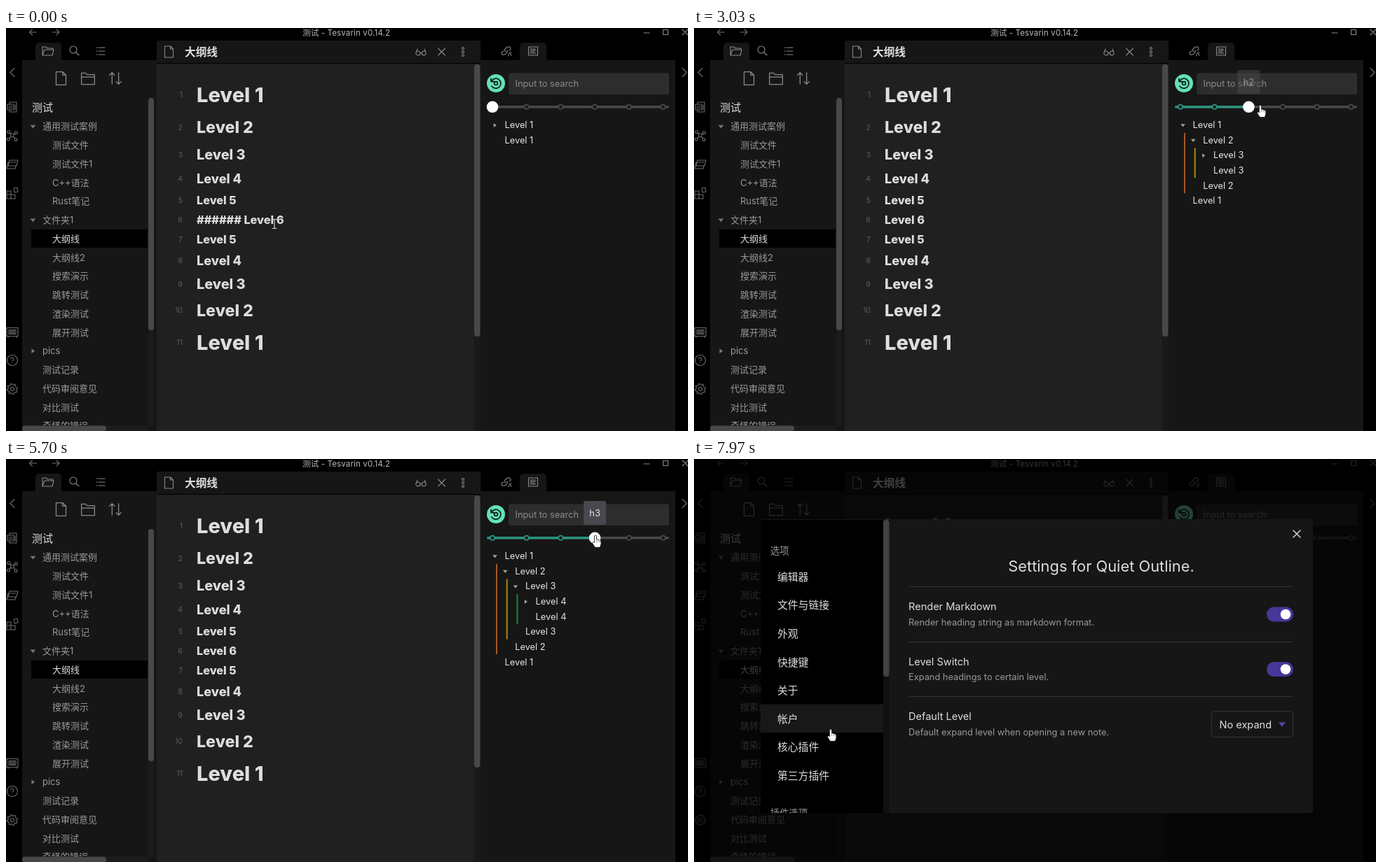
An HTML page for the animation above (8 s loop, 973 px wide and 576 px high).

```html
<!DOCTYPE html>
<html lang="zh">
<head>
<meta charset="utf-8">
<title>Outline demo</title>
<style>
html, body { margin: 0; width: 100%; height: 100%; overflow: hidden; background: #000; }
svg { display: block; font-family: Inter, 'Noto Sans CJK SC', 'Noto Sans CJK', sans-serif; font-optical-sizing: none; }
.icon { fill: none; stroke: #8a8a8a; stroke-width: 1.1; stroke-linecap: round; stroke-linejoin: round; }
.dim { stroke: #6c6c6c; }
</style>
</head>
<body>
<svg id="stage" width="973" height="576" viewBox="0 0 973 576"></svg>
<script>
const LOOP = 8000;
const SIDEBAR = '#161616', EDITOR = '#202020', BRIGHT = '#dcddde', MUTED = '#999', BAR = '#484848';
const GREEN = '#63e2b7', TEAL = '#2a947d', RAIL = '#494949';

const clamp = v => Math.max(0, Math.min(1, v));
const smooth = v => (v = clamp(v), v * v * (3 - 2 * v));

// y is the optical middle of the line
const text = (x, y, str, size, fill = BRIGHT, attrs = '') =>
  `<text x="${x}" y="${y + size * .363}" font-size="${size}" fill="${fill}" ${attrs}>${str}</text>`;
const rect = (x, y, w, h, fill, r = 0, attrs = '') =>
  `<rect x="${x}" y="${y}" width="${w}" height="${h}" rx="${r}" fill="${fill}" ${attrs}/>`;
const circle = (x, y, r, fill, attrs = '') =>
  `<circle cx="${x}" cy="${y}" r="${r}" fill="${fill}" ${attrs}/>`;
const icon = (x, y, d, { dim = false, scale = 1, style = '' } = {}) =>
  `<path class="icon${dim ? ' dim' : ''}" transform="translate(${x} ${y}) scale(${scale})" d="${d}" style="${style}"/>`;
const triangle = (x, y, open, fill = '#a0a0a0', s = 3) =>
  `<path transform="translate(${x} ${y})" fill="${fill}" d="${open
    ? `M${-s * 1.1} ${-s * .6}H${s * 1.1}L0 ${s * .8}Z` : `M${-s * .6} ${-s}V${s}L${s * .8} 0Z`}"/>`;

const DOC = 'M-6-8H2L6-4V8H-6ZM2-8V-4H6';
const FOLDER = 'M-8-6H-3L-1-4H7V-2M-8-6V6H6L8-2H-5L-8 6';
const CLOSED_FOLDER = 'M-8-7H-3L-1-5H8V7H-8ZM-8-2H8';
const LIST = 'M-6-5h1M-3-5H6M-6 0h1M-3 0H6M-6 5h1M-3 5H6';
const CROSS = 'M-5-5L5 5M5-5L-5 5';
const ring = (x, y, r) => `M${x - r} ${y}a${r} ${r} 0 1 0 ${2 * r} 0a${r} ${r} 0 1 0 ${-2 * r} 0`;
const GEAR = ring(0, 0, 2.5) + Array.from({ length: 32 }, (_, i) => {
  const a = Math.PI * (i + .5) / 16, r = i >> 1 & 1 ? 7.6 : 5.8;
  return (i ? 'L' : 'M') + (r * Math.cos(a)).toFixed(1) + ' ' + (r * Math.sin(a)).toFixed(1);
}).join('') + 'Z';

const lineY = [95, 142, 181, 215, 246, 274.5, 302.5, 332, 366, 403.5, 449];
const lineLevel = [1, 2, 3, 4, 5, 6, 5, 4, 3, 2, 1];
const headingSize = [2, 1.6, 1.37, 1.25, 1.12, 1.12].map(em => em * 14.5);

function titleBar() {
  const dim = { dim: true };
  return text(423, 6.5, '测试 - Tesvarin v0.14.2', 11.5, '#b8b8b8', 'letter-spacing=".15"') +
    icon(38.5, 6, 'M5 0H-5M-1-4L-5 0L-1 4', dim) + icon(71, 6, 'M-5 0H5M1-4L5 0L1 4', dim) +
    icon(914, 6, 'M-4 1H4') + icon(941, 6, 'M-3.5-3.5H3.5V3.5H-3.5Z') + icon(969, 6, 'M-4-4L4 4M4-4L-4 4');
}

function ribbons() {
  const dim = { dim: true };
  return icon(9, 63.5, 'M3-6L-3 0L3 6', dim) + icon(968, 63.5, 'M-3-6L3 0L-3 6', dim) +
    icon(9, 113, 'M-4-7H6V7H-4V4M-4-7V-4M-7-4H2V4H-7ZM-5-1H0M-5 1.5H0M4-3V4', dim) +
    icon(9, 153.5, ring(0, 0, 2.5) + ring(-5, -5, 2) + ring(5.5, -4, 2) + ring(-5.5, 5.5, 2) + ring(5, 6, 2) +
      'M-3.5-3.5L-2-2M2-1.5L4-3M-2 2L-4 4M2 2L4 4.5', dim) +
    icon(9, 195, 'M-4-6H8L6 2H-6ZM-6-3L-8 6H4L5 2M-3-3H5', dim) +
    icon(9, 236, 'M-8-3H-2V8H-8ZM-8 2H4V8H-2M4 8V2H-2V-3M2-7L7-8L8-2L3-1Z', dim) +
    icon(9, 434.5, 'M-8-6H8V6H-8ZM-6 6V8M6 6V8M-5-3H5V3H-5Z' + ring(0, 0, 3) + ring(0, 0, 1), dim) +
    icon(9, 475, ring(0, 0, 7.5) + 'M-2-2Q-2-4 0-4T2-2Q2-.5 0 1M0 3.6v.2', dim) +
    icon(9, 516, GEAR, dim);
}

function sidebar() {
  const files = ['-通用测试案例', '测试文件', '测试文件1', 'C++语法', 'Rust笔记', '-文件夹1', '大纲线', '大纲线2',
    '搜索演示', '跳转测试', '渲染测试', '展开测试', '+pics', '=测试记录', '=代码审阅意见', '=对比测试', '=奇怪的错误'];
  const rows = files.map((name, i) => {
    const y = 140.7 + i * 26.75, top = '-+='.includes(name[0]);
    const mark = top && name[0] !== '=' ? triangle(38.5, y, name[0] === '-', '#777', 3.4) : '';
    return mark + text(top ? 52 : 66, y, top ? name.slice(1) : name, 13, i === 6 ? BRIGHT : MUTED);
  }).join('');
  const large = { scale: 1.17 };
  return rect(23, 46, 192, 530, SIDEBAR) + rect(42, 21, 37, 32, SIDEBAR, 5) +
    icon(60, 33, FOLDER) + icon(97, 32, ring(-1, -1, 5) + 'M3 3L7 7') + icon(135, 33, LIST) +
    icon(78.5, 72, DOC, large) + icon(117, 72.5, CLOSED_FOLDER, large) +
    icon(156, 72, 'M-4 7V-7M-7-4L-4-7L-1-4M4-7V7M1 4L4 7L7 4', large) +
    text(37, 113.5, '测试', 15, BRIGHT, 'font-weight="500"') + rect(36, 288, 166, 26, '#000') + rows +
    rect(203, 100, 8, 468, '#1c1c1c', 4) + rect(203, 100, 8, 332, BAR, 4) +
    rect(23, 568, 180, 8, '#1c1c1c') + rect(23, 568.5, 120, 8, BAR, 4);
}

function editor() {
  return rect(215, 18, 462, 32, SIDEBAR) + rect(215, 51, 462, 525, EDITOR) +
    icon(232.5, 34, DOC) + text(255, 34, '大纲线', 15.7, BRIGHT, 'font-weight="700"') +
    icon(592, 34, ring(-4.2, 2, 3) + ring(4.2, 2, 3) + 'M-1.2 2Q0 1 1.2 2M-7 1L-5-4M7 1L5-4') + icon(621.5, 34, CROSS) +
    icon(652, 34, ring(0, -5, 1.5) + ring(0, 0, 1.5) + ring(0, 5, 1.5)) +
    rect(668, 51, 9, 525, '#191919') + rect(668, 52, 8.5, 389, BAR, 4) +
    lineY.map((y, i) => text(252, y, i + 1, 10.7, '#5c5c5c', 'text-anchor="end"') +
      (i === 5 ? '' : heading(i, `Level ${lineLevel[i]}`))).join('');
}
const heading = (i, str) => text(272, lineY[i], str, headingSize[lineLevel[i] - 1], BRIGHT, 'font-weight="800"');

function rightPanel() {
  return rect(677, 46, 278, 530, SIDEBAR) + rect(733, 21, 38, 32, SIDEBAR, 5) +
    icon(714, 33, 'M-1 1Q-4-2-1-4L2-6Q5-7 6-4Q6-2 4-1M1-1Q2 2-1 4L-3 5Q-7 6-7 3Q-7 1-4 0M4 3L7 6M3 5V7M5 2H7') +
    icon(752, 33, 'M-6.5-6H6.5V6H-6.5ZM-4-3H3M-4-1H4M-4 1H2M-4 3H4');
}

function modal() {
  const names = ['编辑器', '文件与链接', '外观', '快捷键', '关于', '帐户', '核心插件', '第三方插件'];
  const setting = (y, name, desc) => text(306, y, name, 14.55) + text(306, y + 22, desc, 12.8, MUTED);
  const toggle = y => rect(817, y - 10.5, 38, 21, '#483699', 10.5) + circle(844, y, 7.3, '#fff');
  const rule = y => rect(307, y, 548, 1, '#343434');
  return rect(0, 0, 973, 576, '#000', 0, 'opacity=".72"') +
    rect(95, 86, 788, 420, SIDEBAR, 3) + rect(95, 87, 175, 419, '#000') + '<g id="option"></g>' +
    rect(270, 87, 9, 419, '#101010') + rect(270, 87, 8.5, 224, '#424242', 4) +
    text(109, 131, '选项', 13.3, MUTED) +
    names.map((name, i) => text(119, 168.5 + i * 40.6, name, 14.8)).join('') +
    `<g clip-path="url(#panel)">${text(109, 506.5, '插件选项', 13.3, MUTED)}</g>` +
    text(581, 153, 'Settings for Quiet Outline.', 21.85, BRIGHT, 'text-anchor="middle"') +
    icon(860, 107, CROSS, { style: 'stroke:#ccc;stroke-width:1.6' }) + rule(182) + rule(261) + rule(339) +
    setting(211, 'Render Markdown', 'Render heading string as markdown format.') + toggle(222) +
    setting(289.5, 'Level Switch', 'Expand headings to certain level.') + toggle(300.5) +
    setting(368, 'Default Level', 'Default expand level when opening a new note.') +
    rect(738.5, 360.5, 116, 37, SIDEBAR, 4, 'stroke="#363636"') + text(749.5, 379.5, 'No expand', 14.55) +
    triangle(839, 379, true, '#5641ad', 4.6);
}

// Level picks: time, level, time at which the value bubble starts to fade
const picks = [[-1000, 0, -900], [1960, 1, 2420], [2700, 2, 2960], [3330, 3, 3500], [3770, 4, 4080],
  [4300, 5, 4560], [4960, 4, 5160], [5420, 3, 5820], [6200, 0, 6200]];
const MODAL_AT = 7620, BLUR_AT = 1960;
const stopX = level => 694 + 48.7 * level;

// Pointer: time, x, y
const route = [[0, 383, 280], [1070, 383, 280], [1880, 740, 113], [1960, 743, 113], [2380, 743, 113], [2640, 791, 111],
  [2940, 791, 111], [3170, 840, 109], [3480, 840, 109], [3760, 881, 109], [4020, 882, 109], [4260, 938, 111],
  [4520, 938, 111], [4840, 888, 109], [5120, 888, 109], [5380, 841, 109], [5780, 841, 109], [6190, 692, 86],
  [6430, 689, 90], [6760, 689, 90], [7450, 11, 513], [7770, 11, 513], [7970, 195, 386], [LOOP, 195, 386]];

function pointerAt(t) {
  const i = route.findIndex(k => k[0] > t), [t0, x0, y0] = route[i - 1], [t1, x1, y1] = route[i];
  const p = smooth((t - t0) / (t1 - t0));
  return { x: x0 + (x1 - x0) * p, y: y0 + (y1 - y0) * p };
}

const inInput = ({ x, y }) => x > 717 && x < 946 && y > 64 && y < 95;

function pointer(pos, t) {
  const { x, y } = pos, open = t >= MODAL_AT;
  const draw = (d, attrs) => `<path transform="translate(${x} ${y})" d="${d}" ${attrs}/>`;
  if (!open && (inInput(pos) || x > 215 && x < 667 && y > 51))
    return draw('M-3-6.5H-1L0-6L1-6.5H3M0-6V6M-3 6.5H-1L0 6L1 6.5H3', 'fill="none" stroke="#e8e8e8"');
  const onHand = open || x < 215 || x > 685 && y < 124;
  return onHand
    ? draw('M-1.6 1Q0-1 1.6 1V6Q3 5 4.3 6.8Q5.6 6 6.4 7.6Q8 7.2 8 9V12.5L6.4 17.3H-.6L-4.4 11.5Q-4.6 8.5-1.6 10.5Z',
      'fill="#fff" stroke="#111" stroke-width=".8"') + draw('M1.6 7V10M4.2 7.5V10M6.2 8.5V10.5', 'stroke="#555" stroke-width=".6"')
    : draw('M0 0V15L3.5 12L6 17L8 16L5.8 11.2H10.5Z', 'fill="#fff" stroke="#111" stroke-width=".8"');
}

function outline(from, to, p) {
  const low = Math.min(from, to), shown = to > from ? p : 1 - p, pitch = 21.65;
  const deep = shown > 0 ? Math.max(from, to) : low;
  const rows = [];
  for (let d = 0; d <= deep; d++) rows.push({ d, first: true });
  for (let d = deep === 5 ? 4 : deep; d >= 0; d--) rows.push({ d });
  const hidden = rows.filter(r => r.d > low).length * pitch * (1 - shown);
  rows.forEach((r, i) => r.y = 138.5 + i * pitch - (!r.first && r.d <= low ? hidden : 0));
  const colors = ['#a8581f', '#a58c10', '#23862f', '#235f9c', '#7c1681'];
  let out = '';
  for (const { d, first, y } of rows) {
    const x = 14.7 * d, opened = d < low || d < deep && shown > .5;
    const end = rows.findLast(r => r.d === d).y - pitch / 2;
    out += `<g opacity="${d > low ? shown : 1}">` + text(711.5 + x, y, `Level ${d + 1}`, 12.8, '#e4e4e4') +
      (first && d < 5 ? triangle(697.5 + x, y + .5, opened) : '') +
      (first && d < deep ? rect(699 + x, y + 11.5, 2, Math.max(0, end - y - 11.5), colors[d]) : '') + '</g>';
  }
  return out;
}

function controls(t, pos, now, level) {
  const x = stopX(level), hot = t >= 6150;
  const tip = clamp((t - now[0]) / 150) * clamp(1 - (t - now[2]) / 150);
  const marks = [0, 1, 2, 3, 4, 5].map(i =>
    circle(stopX(i), 112.8, 3.2, '#18181c', `stroke="${i <= level && level ? TEAL : RAIL}" stroke-width="1.6"`)).join('');
  return circle(699, 79, 13, hot ? '#7fe7c4' : GREEN) +
    icon(699, 79, 'M-6.3-3A7 7 0 1 1-6 4M-7-6.5V-2.5H-3' + ring(0, 0, 2.4), { style: 'stroke:#10201a;stroke-width:1.8' }) +
    rect(717, 64.5, 229, 30.5, '#2d2d2d', 3, inInput(pos) ? `stroke="${GREEN}"` : '') +
    text(726.5, 79.5, 'Input to search', 12.8, '#8b8b8b') +
    rect(686, 111, 260, 3.6, RAIL, 1.8) + (level ? rect(686, 111, x - 686, 3.6, TEAL, 1.8) : '') +
    marks + circle(x, 112.8, 8.3, '#fff') +
    (tip && level ? `<g opacity="${tip}">` + rect(x - 16, 60, 32, 34, '#48484e', 3) +
      text(x, 77, `h${level}`, 12.8, '#e6e6e6', 'text-anchor="middle"') + '</g>' : '');
}

function editorLive(t, pos) {
  const editing = t < BLUR_AT;
  const caret = editing && (t >= 580 && t < 1080 || t >= 1610);
  const over = pos.x > 215 && pos.x < 667 ? lineY.findIndex(y => Math.abs(y - pos.y) < 15) : -1;
  return heading(5, editing ? '###### Level 6' : 'Level 6') + (caret ? rect(399, 264, 1, 20, BRIGHT) : '') +
    (over >= 0 && over < 5 ? triangle(265, lineY[over], true, '#666') : '');
}

const ribbonTip = t => `<g opacity="${clamp((t - 7440) / 100)}">` + rect(28, 505, 52, 28, '#000', 4) +
  '<path d="M28 515L24 519L28 523Z"/>' + text(54.5, 519, '设置', 13.3, BRIGHT, 'text-anchor="middle"') + '</g>';

const stage = document.getElementById('stage');
stage.innerHTML = '<clipPath id="panel"><rect x="95" y="86" width="788" height="420"/></clipPath>' +
  rect(0, 0, 973, 576, '#000') + titleBar() + ribbons() + sidebar() + editor() + rightPanel() +
  `<g id="live"></g><g id="modal">${modal()}</g><g id="pointer"></g>`;
const [live, dialog, option, cursor] = ['live', 'modal', 'option', 'pointer'].map(id => document.getElementById(id));

function frame() {
  const t = performance.now() % LOOP, pos = pointerAt(t), open = t >= MODAL_AT;
  const i = picks.findLastIndex(p => t >= p[0]), now = picks[i], before = picks[Math.max(0, i - 1)];
  live.innerHTML = editorLive(t, pos) + outline(before[1], now[1], smooth((t - now[0] - 30) / 180)) +
    controls(t, pos, now, now[1]) + (t > 7440 && !open ? ribbonTip(t) : '');
  dialog.style.display = open ? '' : 'none';
  const item = Math.floor((pos.y - 147.5) / 40.6);
  option.innerHTML = pos.x > 95 && item >= 0 && item < 8 ? rect(95, 147.5 + item * 40.6, 175, 40.6, '#181818') : '';
  const pressed = t - now[0] < 130;
  cursor.innerHTML = (pressed ? circle(pos.x - 1, pos.y + 2, 11, '#e6de00', 'opacity=".6"') : '') + pointer(pos, t);
  requestAnimationFrame(frame);
}
frame();
</script>
</body>
</html>
```
